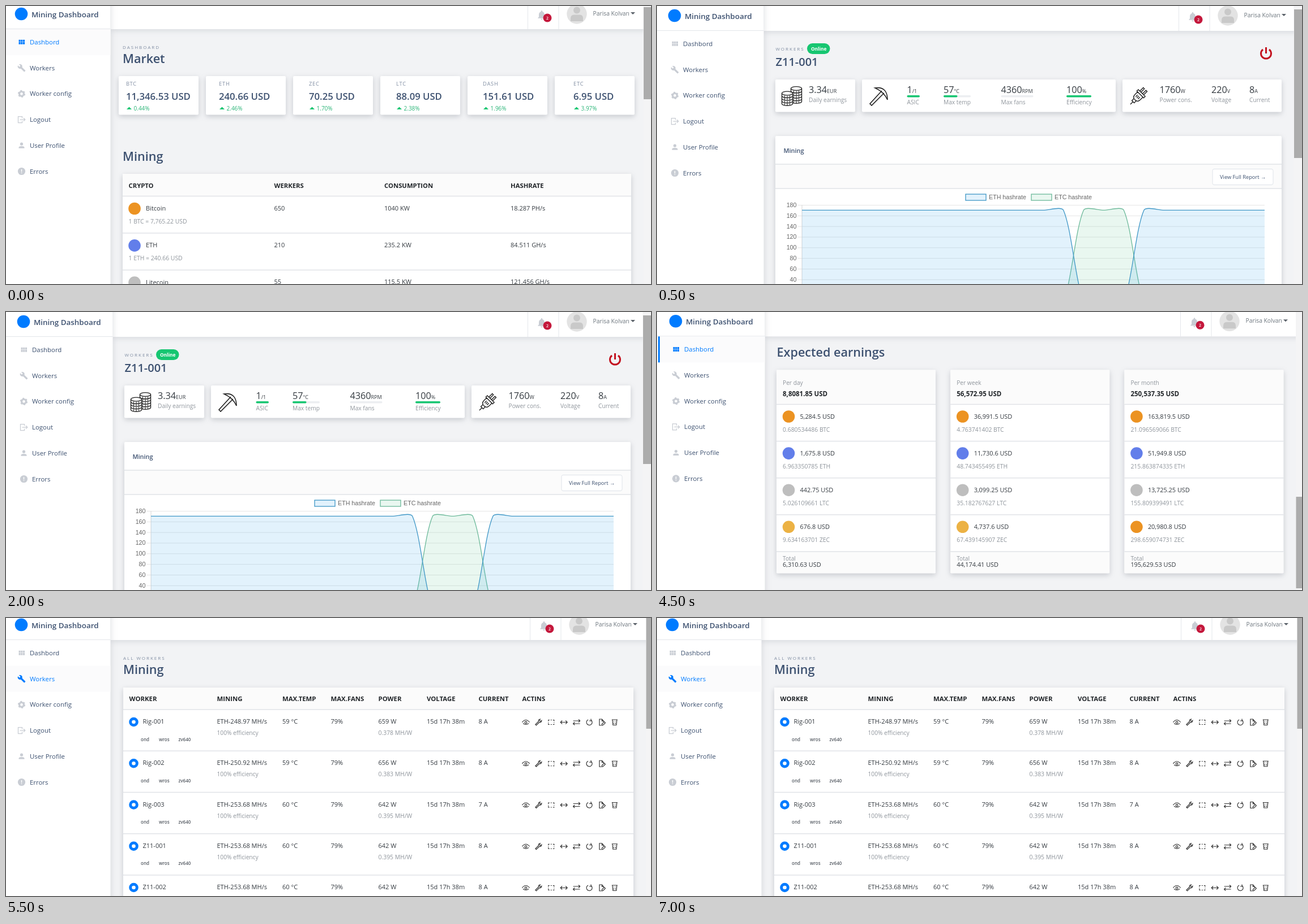
Animation, 1139 px wide and 492 px high, one loop 8 s. Source, as an HTML page:

```html
<!DOCTYPE html>
<html lang="en">
<head>
<meta charset="utf-8">
<title>Mining Dashboard</title>
<style>
html, body { margin: 0; width: 100%; height: 100%; overflow: hidden; background: #f2f3f5; }
svg { display: block; width: 1139px; height: 492px; font-family: "Open Sans", "Noto Sans", sans-serif; }
.card { filter: drop-shadow(0 3px 5px rgba(80, 88, 105, .27)); }
.bar { filter: drop-shadow(0 1px 6px rgba(80, 88, 105, .2)); }
.line { fill: none; stroke: #333; stroke-width: 1.2; }
.arial { font-family: "Liberation Sans", Arial, sans-serif; }
</style>
</head>
<body>
<svg id="stage" viewBox="0 0 1139 492"></svg>
<script>
const INK = '#343a40', SLATE = '#3d5170', MUTED = '#8f959c', RULE = '#dfe2e6';
const BLUE = '#007bff', GREEN = '#17c671', RED = '#c4183c', GREY = '#c9cdd4';
const COIN = { BTC: '#ec9322', ETH: '#627eea', LTC: '#bebebe', ZEC: '#ecb244' };

const text = (x, y, s, size = 11, fill = INK, weight = 400, more = '') =>
  `<text x="${x}" y="${y}" font-size="${size}" fill="${fill}" font-weight="${weight}" ${more}>${s}</text>`;
const rect = (x, y, w, h, fill = '#fff', more = '') =>
  `<rect x="${x}" y="${y}" width="${w}" height="${h}" fill="${fill}" ${more}/>`;
const circle = (x, y, r, fill, more = '') => `<circle cx="${x}" cy="${y}" r="${r}" fill="${fill}" ${more}/>`;
const path = (d, more = 'class="line"') => `<path d="${d}" ${more}/>`;
const at = (x, y, s, scale = 1) => `<g transform="translate(${x} ${y}) scale(${scale})">${s}</g>`;
const each = (list, fn) => list.map(fn).join('');
const card = (x, y, w, h) => rect(x, y, w, h, '#fff', 'rx="2" class="card"');
const rule = (x, y, w) => rect(x, y - .7, w, 1.4, RULE);
const muted = (x, y, s, size = 10.2) => text(x, y, s, size, MUTED);
const heading = (x, y, s, size = 21.6) => text(x, y, s, size, SLATE, 600);
const label = (x, y, s, size = 8, gap = 2) => text(x, y, s, size, '#818ea3', 400, `letter-spacing="${gap}"`);
const coin = (x, y, name) => circle(x, y, 10.8, COIN[name]);

// Icons centred on 0,0
const dot = s => `<g transform="scale(.62) translate(-12 -12)">${s}</g>`;
const icons = [
  c => dot(path('M4 5h5v6H4zM10 5h5v6h-5zM16 5h5v6h-5zM4 12h5v6H4zM10 12h5v6h-5zM16 12h5v6h-5z', `fill="${c}"`)),
  c => dot(path('M22.7 19l-9.1-9.1c.9-2.3.4-5-1.5-6.9-2-2-5-2.4-7.4-1.3L9 6 6 9 1.6 4.7C.4 7.1.9 10.1 2.9 12.1c1.9 1.9 4.6 2.4 6.9 1.5l9.1 9.1c.4.4 1 .4 1.4 0l2.3-2.3c.5-.4.5-1.1.1-1.4z', `fill="${c}"`)),
  c => circle(0, 0, 3.9, 'none', `stroke="${c}" stroke-width="3.2"`) +
       circle(0, 0, 5.6, 'none', `stroke="${c}" stroke-width="2" stroke-dasharray="2.93"`),
  c => path('M1-2.5V-5.5H-6V5.5H1V2.5M-3 0H6M3.5-2.8L6.3 0 3.5 2.8', `fill="none" stroke="${c}" stroke-width="1.3"`),
  c => circle(0, -2.6, 2.6, c) + path('M-5 5V3.6C-5 .4 5 .4 5 3.6V5z', `fill="${c}"`),
  c => circle(0, 0, 6.6, c) + rect(-.7, -3.6, 1.4, 4.6) + rect(-.7, 2.2, 1.4, 1.4),
];
const menu = ['Dashbord', 'Workers', 'Worker config', 'Logout', 'User Profile', 'Errors'];

// Shared frame: header, sidebar and scrollbar
function shell({ left = 0, top = 0, right = 0, active = -1, mark = false, track, thumb }) {
  const width = 184.5 + left, bottom = 41 + top;
  const header = rect(width, -20, 1139, bottom + 20, '#fff', 'class="bar"') + at(right, top,
    rect(921, -5, 1, 46, '#e4e7eb') + rect(975.5, -5, 1, 46, '#e4e7eb') +
    at(946, 16, dot(path('M12 22c1.1 0 2-.9 2-2h-4c0 1.1.9 2 2 2zm6-6v-5c0-3-1.6-5.6-4.5-6.3V4a1.5 1.5 0 0 0-3 0v.7C7.6 5.4 6 8 6 11v5l-2 2v1h16v-1z', `fill="${GREY}"`)), 1.35) +
    circle(956, 21, 7.5, RED) + text(956, 23.6, '2', 7, '#fff', 600, 'text-anchor="middle"') +
    circle(1008, 14, 17.7, '#e3e3e3') + circle(1008, 7.5, 6, '#c9c9c9') +
    path('M997 27V22Q997 15.5 1003 15.5H1013Q1019 15.5 1019 22V27Z', 'fill="#c9c9c9"') +
    text(1036.5, 17, 'Parisa Kolvan', 10.3, '#6c757d') + path('M1103 11h8l-4 4z', 'fill="#5a6169"'));
  const side = rect(-20, -20, width + 20, 540, '#fff', 'class="bar"') + rect(0, bottom - 1, width, 1, '#e3e6ea') +
    circle(27 + left, 14 + top, 11.3, BLUE) + text(45 + left, 19.5 + top, 'Mining Dashboard', 13.4, SLATE, 600) +
    each(menu, (name, i) => {
      const y = 64 + top + i * 45.7, on = i === active;
      return (on ? rect(0, y - 23, width, 46, '#fbfbfc') : '') + (on && mark ? rect(2, y - 23, 3, 46, BLUE) : '') +
        at(27.5 + left, y, icons[i](on ? BLUE : GREY)) + text(42 + left, y + 4, name, 11.4, on ? BLUE : SLATE);
    });
  return header + side + rect(track, 0, 1139 - track, 492, '#f4f4f5') +
    rect(track + .5, thumb[0], 1139 - track, thumb[1] - thumb[0], '#acacac');
}

function marketPage() {
  const prices = [
    ['BTC', '11,346.53', '0.44', 212], ['ETH', '240.66', '2.46', 376], ['ZEC', '70.25', '1.70', 535],
    ['LTC', '88.09', '2.38', 689], ['DASH', '151.61', '1.96', 842], ['ETC', '6.95', '3.97', 1002]];
  const rows = [
    ['BTC', 'Bitcoin', '7,765.22', '650', '1040 KW', '18.287 PH/s'],
    ['ETH', 'ETH', '240.66', '210', '235.2 KW', '84.511 GH/s'],
    ['LTC', 'Litecoin', '88.09', '55', '115.5 KW', '121.456 GH/s']];
  const columns = [216.5, 473.5, 668, 891];
  return label(206, 75.5, 'DASHBOARD') + heading(206, 101, 'Market') +
    each(prices, ([name, price, gain, x], i) => card(199 + 154 * i, 124, 141, 68.5) +
      label(x, 140.5, name, 9.3, .8) + text(x, 166, price + ' USD', 16.7, SLATE, 600) +
      path(`M${x + 1} 183h9l-4.5-4.5z`, `fill="${GREEN}"`) + text(x + 13.5, 185, gain + '%', 10, '#2bb578')) +
    heading(206, 274, 'Mining') + card(206, 297, 898, 220) + rect(206, 297, 898, 39, '#fbfbfb') +
    each(['CRYPTO', 'WERKERS', 'CONSUMPTION', 'HASHRATE'], (s, i) => text(columns[i], 321.5, s, 11.3, '#212529', 700)) +
    each(rows, ([code, name, price, ...cells], i) => {
      const y = 336.5 + 65.4 * i;
      return rule(206, y, 898) + coin(227, y + 22, code) + text(247, y + 25.5, name) +
        muted(216.5, y + 48.5, `1 ${code} = ${price} USD`, 10.4) +
        each(cells, (s, k) => text(columns[k + 1], y + 25, s));
    }) + shell({ active: 0, track: 1125.5, thumb: [2, 165] });
}

// Cubic curve through evenly spaced points, kept below the chart's top edge
function curve(points, tension = .25) {
  const handles = points.map(([x, y], i) => {
    const [ax, ay] = points[i - 1] || [x, y], [bx, by] = points[i + 1] || [x, y];
    const a = Math.hypot(x - ax, y - ay), b = Math.hypot(bx - x, by - y);
    const before = tension * a / (a + b), after = tension * b / (a + b), cap = v => Math.max(352, v);
    return [x - before * (bx - ax), cap(y - before * (by - ay)), x + after * (bx - ax), cap(y + after * (by - ay))];
  });
  return 'M' + points[0] + each(points.slice(1), (p, i) =>
    `C${handles[i].slice(2)} ${handles[i + 1].slice(0, 2)} ${p}`);
}

function chart() {
  const yOf = v => 521.5 - v * .9417;
  const series = (inside, stroke, fill) => {
    const points = Array.from({ length: 24 }, (_, i) => [256 + 35.52 * i, yOf((i > 13 && i < 17) === inside ? 170 : 0)]);
    const d = curve(points);
    return path(d + `V${yOf(0)}H256Z`, `fill="${fill}"`) + path(d, `fill="none" stroke="${stroke}" stroke-width="1.3"`);
  };
  const blue = ['#3f97c6', 'rgba(54,162,235,.14)'], green = ['#6cb99a', 'rgba(60,180,120,.11)'];
  const key = (x, name, [stroke, fill]) => rect(x, 333, 36, 11, fill, `stroke="${stroke}" stroke-width="1.3"`) +
    text(x + 41, 342, name, 10.7, '#666');
  return `<g class="arial">` + key(545, 'ETH hashrate', blue) + key(661, 'ETC hashrate', green) +
    each([180, 160, 140, 120, 100, 80, 60, 40], v => rect(249, yOf(v), 824, 1, '#e5e5e5') +
      text(246.5, yOf(v) + 4, v, 10.7, '#666', 400, 'text-anchor="end"')) + '</g>' +
    rect(255.5, 352, 1, 150, '#d5d5d5') + series(true, ...green) + series(false, ...blue);
}

function workerPage() {
  const stat = (x, value, unit, name, low = 0) =>
    text(x, 153.5, `${value}<tspan font-size="9">${unit}</tspan>`, 16.2, INK) + muted(x, 170 + low, name);
  const gauge = (x, w, done) => rect(x, 158, w, 3.5, '#eceef1', 'rx="1.7"') + rect(x, 158, w * done, 3.5, GREEN, 'rx="1.7"');
  const stack = (x, top, n) => each([...Array(n).keys()].reverse(), k => {
    const y = top + k * 4.6;
    return path(`M${x} ${y}v4.6a9.5 3.4 0 0 0 19 0v-4.6`, 'fill="#fff" stroke="#222" stroke-width="1.4"') +
      path(`M${x + 5} ${y + 4}v3M${x + 9.5} ${y + 4.5}v3M${x + 14} ${y + 4}v3`);
  }) + `<ellipse cx="${x + 9.5}" cy="${top}" rx="9.5" ry="3.4" fill="#fff" stroke="#222" stroke-width="1.4"/>`;
  const plug = path('M-7-5H7V2Q7 9 0 9T-7 2ZM-9-9H9V-5H-9ZM-5-9V-18H-2V-9M2-9V-18H5V-9M-3 9V14H3V9M0 14V21M-3-1V4M0-1V4M3-1V4',
    'fill="#fff" stroke="#222" stroke-width="1.5"');
  return label(209.5, 79, 'WORKERS') + rect(265, 66, 40.5, 19, GREEN, 'rx="9.5"') + text(272, 78.7, 'Online', 8.3, '#fff', 700) +
    heading(209.5, 106, 'Z11-001', 20) +
    path('M1070 77a9 9 0 1 0 11 0M1075.5 73v11', 'fill="none" stroke="#c3121f" stroke-width="3"') +
    card(209, 130, 141, 57.5) + card(362, 130, 448, 57.5) + card(822, 130, 281, 57.5) +
    stack(236.5, 146, 5) + stack(220.5, 154.5, 4) + stat(268, '3.34', 'EUR', 'Daily earnings') +
    path('M385 145Q407 142 407 166Q401 152 385 145ZM397 150L376 173L379 176L401 154', 'fill="#fff" stroke="#222" stroke-width="1.6"') +
    stat(441.5, '1', '/1', 'ASIC', 3.5) + gauge(441.5, 22.5, 1) +
    stat(506, '57', '°C', 'Max temp', 3.5) + gauge(506, 48, .51) +
    stat(607.5, '4360', 'RPM', 'Max fans', 3.5) + gauge(607.5, 57, 0) +
    stat(723, '100', '%', 'Efficiency', 3.5) + gauge(723, 44, 1) +
    `<g transform="translate(850 160) rotate(45) scale(.95)">${plug}</g>` +
    stat(887.5, '1760', 'W', 'Power cons.') + stat(979, '220', 'V', 'Voltage') + stat(1046, '8', 'A', 'Current') +
    card(209, 230, 894, 290) + text(223.5, 260, 'Mining', 10.9, SLATE, 600) +
    rect(209, 280, 894, 43, '#fbfbfb') + rule(209, 280, 894) + rule(209, 323, 894) +
    rect(981, 288.5, 107, 28, '#fff', 'rx="3" stroke="#dfe3e9"') + text(994, 306, 'View Full Report →', 9.3, SLATE) +
    chart() + shell({ left: 4, top: 3, track: 1124.5, thumb: [6, 269] });
}

function earningsPage() {
  const periods = [
    ['Per day', '8,8081.85', '6,310.63', ['5,284.5', '1,675.8', '442.75', '676.8'],
      ['0.680534486', '6.963350785', '5.026109661', '9.634163701']],
    ['Per week', '56,572.95', '44,174.41', ['36,991.5', '11,730.6', '3,099.25', '4,737.6'],
      ['4.763741402', '48.743455495', '35.182767627', '67.439145907']],
    ['Per month', '250,537.35', '195,629.53', ['163,819.5', '51,949.8', '13,725.25', '20,980.8'],
      ['21.096569066', '215.863874335', '155.809399491', '298.659074731']]];
  return heading(211.5, 79, 'Expected earnings') + each(periods, ([name, sum, total, usd, amounts], p) => {
    const x = 211 + 307.2 * p;
    return card(x, 102.5, 281, 360) + rect(x, 102.5, 281, 61, '#fbfbfb') + rect(x, 424, 281, 38, '#fbfbfb') +
      muted(x + 11, 129, name) + text(x + 11, 148.5, sum + ' USD', 11.5, '#212529', 700) +
      each(Object.keys(COIN), (code, i) => {
        const y = 163.5 + 65.1 * i;
        return rule(x, y, 281) + coin(x + 21.5, y + 21.5, p === 2 && i === 3 ? 'BTC' : code) +
          text(x + 41.5, y + 25, usd[i] + ' USD', 10.9) + muted(x + 11, y + 48, `${amounts[i]} ${code}`, 10.4);
      }) + rule(x, 424, 281) + muted(x + 11, 439.5, 'Total') + text(x + 11, 451, total + ' USD', 10.9);
  }) + shell({ left: 6, top: 2.3, right: 3, active: 0, mark: true, track: 1128, thumb: [327, 489] });
}

function workersPage() {
  const columns = [217.5, 372.5, 488, 573.5, 657.5, 743, 834.5, 911.5];
  const rows = [
    ['Rig-001', 248.97, 59, 659, .378, 8], ['Rig-002', 250.92, 59, 656, .383, 8], ['Rig-003', 253.68, 60, 642, .395, 7],
    ['Z11-001', 253.68, 60, 642, .395, 8], ['Z11-002', 253.68, 60, 642, .395, 8]];
  const actions = [
    'M-6.5 0Q0-8 6.5 0M-5 2Q0 6 5 2M-1.8 .5a1.8 1.8 0 1 0 3.6 0a1.8 1.8 0 1 0-3.6 0',
    'M-5.5 4L0-1.5Q-1-5 3-5.5L1.5-3 3-1.5 5.5-3Q5 1 1.5 0L-4 5.5Z',
    'M-5-2V-4H-3M-1-4H1M3-4H5V-2M5 0V1M5 3V4H3M1 4H-1M-3 4H-5V2M-5 1V0',
    'M-6 0H6M-3-3L-6 0-3 3M3-3L6 0 3 3',
    'M-6-2.5H6M3.5-5L6-2.5 3.5 0M6 2.5H-6M-3.5 0L-6 2.5-3.5 5',
    'M-2-4.5A5 5 0 1 0 3-4M3-6V-2.5H0',
    'M3-1V-2L0-5.5H-4.5V5.5H-1M0-5V-2H3M0 5.5L0 3 4-1 6 1 2 5Z',
    'M-5-4.5H5M-4-4.5L-3 5H3L4-4.5M-1.5-2V-1M1.5-2V-1M-1.5 1V3M1.5 1V3'];
  return label(207, 74, 'ALL WORKERS') + heading(207, 99, 'Mining') +
    card(207, 123, 901, 400) + rect(207, 123, 901, 39, '#fbfbfb') +
    each(['WORKER', 'MINING', 'MAX.TEMP', 'MAX.FANS', 'POWER', 'VOLTAGE', 'CURRENT', 'ACTINS'],
      (s, i) => text(columns[i], 147, s, 11.4, '#212529', 700)) +
    each(rows, ([name, rate, temp, watts, ratio, amps], i) => {
      const y = 162 + 73.25 * i;
      const cells = [`ETH-${rate} MH/s`, `${temp} °C`, '79%', `${watts} W`, '15d 17h 38m', `${amps} A`];
      return rule(207, y, 901) + circle(225.5, y + 22, 5.8, '#fff', `stroke="${BLUE}" stroke-width="5"`) +
        text(241.5, y + 25, name) + each(cells, (s, k) => text(columns[k + 1], y + 25, s)) +
        muted(372.5, y + 45, '100% efficiency') + muted(657.5, y + 45, `${ratio.toFixed(3)} MH/W`, 10.4) +
        each([['ond', 238], ['wros', 270], ['zv640', 304.5]], ([s, x]) => text(x, y + 55.5, s, 8, '#555b63', 600)) +
        each(actions, (d, k) => at(918 + 22.4 * k, y + 22.5, path(d)));
    }) + shell({ top: -2, right: 4, active: 1, track: 1130, thumb: [0, 196] });
}

const stage = document.getElementById('stage');
stage.innerHTML = each([marketPage, workerPage, earningsPage, workersPage], page => `<g>${page()}</g>`);
const pages = [...stage.children], starts = [0, 500, 3000, 5500];

function tick() {
  const time = performance.now() % 8000;
  const current = starts.filter(s => s <= time).length - 1;
  pages.forEach((page, i) => page.style.display = i === current ? '' : 'none');
  requestAnimationFrame(tick);
}
tick();
</script>
</body>
</html>
```
